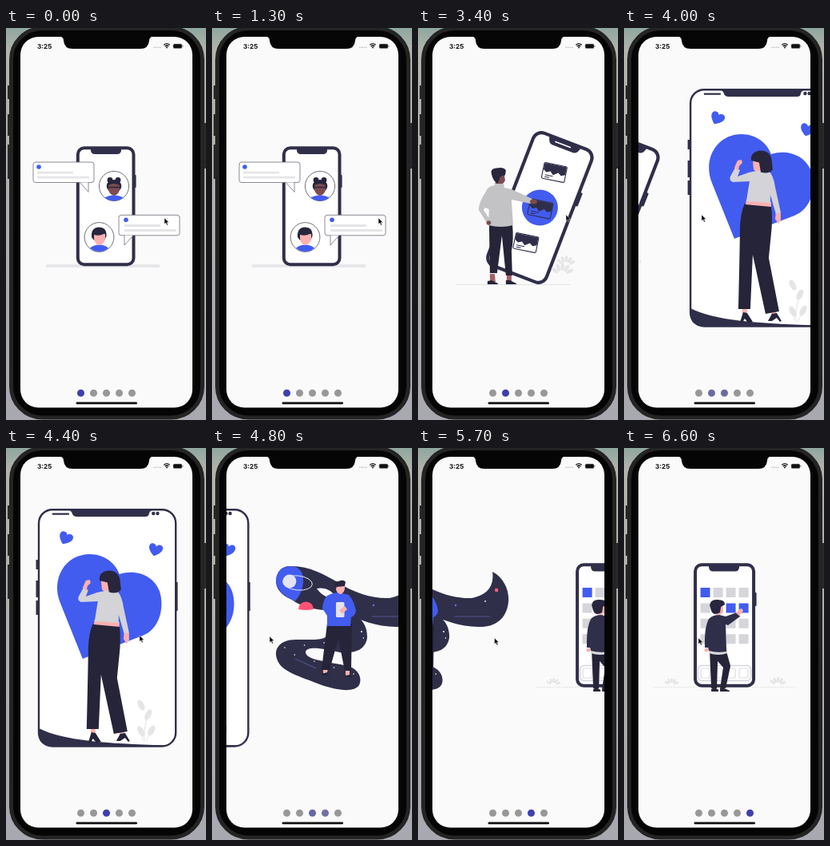
These frames come from a looping animation (250x491 px, 6.8 s). An HTML page with a canvas:

```html
<!DOCTYPE html>
<html lang="en">
<head>
<meta charset="utf-8">
<title>Onboarding carousel</title>
<style>
  html, body { margin: 0; width: 100%; height: 100%; overflow: hidden; background: #b0b0ae; }
  canvas { display: block; width: 250px; height: 491px; }
</style>
</head>
<body>
<canvas id="stage"></canvas>
<script>
const W = 250, H = 491, LOOP = 6800, STEP = 100, PAGE = 215;
const PAPER = '#fafafa', WHITE = '#ffffff', INK = '#302f4a', DARK = '#252438', HAIR = '#27263c';
const BLUE = '#425cf0', PALE = '#e5e5e8', PINK = '#fbb0b0', BROWN = '#7d4c50';
const DOT_ON = [63, 63, 176], DOT_OFF = [152, 152, 152];

const canvas = document.getElementById('stage');
const ctx = canvas.getContext('2d');
const dpr = window.devicePixelRatio || 1;
canvas.width = W * dpr;
canvas.height = H * dpr;

// --- drawing helpers -------------------------------------------------
function paint(path, fill, stroke, width = 1) {
  if (fill) { ctx.fillStyle = fill; ctx.fill(path); }
  if (stroke) { ctx.strokeStyle = stroke; ctx.lineWidth = width; ctx.stroke(path); }
}
function shape(d, fill, stroke, width) { paint(new Path2D(d), fill, stroke, width); }
function box(x, y, w, h, r, fill, stroke, width) {
  const p = new Path2D();
  p.roundRect(x, y, w, h, r);
  paint(p, fill, stroke, width);
}
function oval(x, y, rx, ry, fill, stroke, width, turn = 0) {
  const p = new Path2D();
  p.ellipse(x, y, rx, ry, turn, 0, 7);
  paint(p, fill, stroke, width);
}
function disc(x, y, r, fill, stroke, width) { oval(x, y, r, r, fill, stroke, width); }
function line(d, color, width) { shape(d, null, color, width); }
function at(x, y, turn, draw) {
  ctx.save();
  ctx.translate(x, y);
  ctx.rotate(turn);
  draw();
  ctx.restore();
}
function leaves(x, y, size) {
  for (let i = 0; i < 5; i++) {
    const a = -2.5 + i * 0.5;
    oval(x + Math.cos(a) * size, y + Math.sin(a) * size, size * 0.45, size * 0.2, PALE, null, 0, a);
  }
}

// --- page 1: chat ----------------------------------------------------
function bubble(x, y, tail, dotX) {
  box(x, y, 76, 25.5, 3, WHITE, '#6e6d7c', 0.8);
  shape(tail, WHITE, '#6e6d7c', 0.8);
  disc(x + dotX, y + 6, 2.8, BLUE);
  line(`M${x + dotX - 2} ${y + 13.2}h45M${x + dotX - 2} ${y + 19.2}h65`, PALE, 2.8);
}
function chatPage() {
  line('M50 298H192', PALE, 3.5);
  box(160, 184, 2.6, 16, 1, INK);
  box(89.8, 150.3, 69.7, 146, 8, WHITE, INK, 4);
  shape('M106 151h38v3q-1 4-5 4h-28q-4 0-5-4z', INK);
  bubble(34, 168, 'M92.5 193.5L103 205.5V193.5', 7);
  bubble(141, 234.3, 'M148 259.8V272L159 259.8', 9);

  disc(135, 198, 18.6, WHITE, '#4d4c60', 0.8);
  shape('M123.5 212.5q5-3 11.5-3t11.5 3q-5 4-11.5 4t-11.5-4z', BLUE);
  disc(130, 190.5, 3.4, HAIR);
  disc(140, 190.5, 3.4, HAIR);
  oval(135, 198, 9.3, 8, HAIR);
  shape('M128 197q7-4 14 0v6q-2 6-7 7q-5-1-7-7z', BROWN);
  line('M128 199.5h14', HAIR, 1.6);

  disc(116.5, 262, 18.4, WHITE, '#4d4c60', 0.8);
  shape('M105 275.5q5-4 11.5-4t11.5 4q-5 4.5-11.5 4.5t-11.5-4.5z', BLUE);
  shape('M107 262q-1-12 9-12.5q10 0 9.5 11l-2 5h-14z', HAIR);
  shape('M110 259q7 2 12-1h2v6q-1 6-7 8q-6-1-7-8z', PINK);
}

// --- page 2: cards ---------------------------------------------------
function card(x, y, fill) {
  at(x, y, 0.2, () => {
    box(-14.5, -10, 29, 20, 1.5, fill, INK, 1.1);
    shape('M-14-9.5h28v10l-5 2-4-3-6 4-4-4-5 2-4-3z', INK);
    line('M-11 5h10M-11 7.5h6', INK, 1);
  });
}
function cardPage() {
  line('M46 321.5H190', '#dedee2', 0.8);
  at(151.5, 225, 0.367, () => {
    box(40, -36, 3.5, 18, 1, INK);
    box(-39, -89, 78, 178, 11, WHITE, INK, 4.2);
    shape('M-21-88h42q-2 9-7 9h-28q-5 0-7-9z', INK);
    line('M-12-84H9', WHITE, 1.5);
  });
  leaves(179, 310, 11);
  leaves(184, 298, 9);
  disc(151.5, 225, 22.5, BLUE);
  card(169.5, 181, WHITE);
  card(152, 226.5, BLUE);
  card(134, 269, WHITE);

  shape('M89 308h6l1 10h-7zM110 308h6v10h-6z', '#a4606a');
  shape('M86 321v-4l5-1 8 4v1zM109 321v-5h5l8 4v1z', DARK);
  shape('M88 245h29q2 20-1 34l1 31h-8l-5-50-6 47H89z', DARK);
  shape('M95 193l11 0 1 7 9 2 26 12-2 6-24-5 2 32q-15 4-31 0l1-20-5-2-2 3 8 12-4 4-10-16q0-10 9-23 2-7 11-8z', '#c3c3c6');
  disc(87.5, 244, 2.8, BROWN);
  oval(143.5, 217.5, 4.5, 3, BROWN);
  shape('M97 184h10l1 7q-2 5-7 4h-5z', BROWN);
  shape('M91 183q-2-7 6-7.5q10-2 12 3l-1 6q-4 0-6 2l-3 8q-6-2-8-11.5z', HAIR);
}

// --- page 3: heart ---------------------------------------------------
function heart(x, y, size, turn) {
  at(x, y, turn, () => {
    ctx.scale(size, size);
    shape('M0 8C-14-1-9-9-4-8Q-1-8 0-5Q1-8 4-8C9-9 14-1 0 8z', BLUE);
  });
}
function heartPage() {
  line('M81 140v12M81 166v21M81 191v18M255.5 168v36', INK, 2.6);
  box(83.2, 77.2, 171.2, 296.3, 17, WHITE, INK, 2.4);
  shape('M118 77h110q-6 1-7 5 0 4-5 4H131q-5 0-6-4-1-4-7-5z', INK);
  line('M100 82.6h21', INK, 2.2);
  disc(226.5, 82, 2.2, INK);
  disc(231.7, 82, 2.2, INK);
  shape('M83 351C115 367 168 370 240 372.5L236 374H98Q84 372 83 360z', INK);
  heart(116.5, 113.5, 0.95, 0.45);
  heart(229, 128, 0.95, 0.25);
  shape('M138 264L110 194C98 164 116 133 147 133C165 133 179 144 184 158C205 151 227 160 234 179C241 200 234 227 213 235z', BLUE);
  for (const [x, y] of [[211, 322], [220, 334], [211, 355], [224, 354]]) {
    oval(x, y, 3.6, 7.2, PALE, null, 0, x % 2 ? -0.5 : 0.5);
  }
  line('M215 368Q214 345 221 335M213 366L211 352M217 368L225 352', PALE, 1);

  shape('M148 348h6v9h-6zM184 353h6v8h-6z', PINK);
  shape('M145 369l4-13 5 1 7 11-6 1-4-5-3 5zM180 367l5-9 6-1 6 10-2 1-4-5-6 4z', DARK);
  shape('M151 220h33q2 22 0 38l-3 30 13 67-17 3-16-74-3 68h-15q2-83 2-102 1-20 6-30z', DARK);
  shape('M153 215l31 3v6l-32-3z', PINK);
  shape('M190 231l6 0 0 10-3 4-4-6z', PINK);
  shape('M163 177l13-2 1 10-10 2z', PINK);
  shape('M156 181q18-4 25-2 6 6 8 20l7 32-6 2-7-24v10l-30-2 4-25-21 1q-5-2-3-7l6-11 6 3-3 8z', '#d4d3d8');
  shape('M138 175l4-9 5-1 1 4-4 4-1 6z', PINK);
  shape('M161 164l9-3 3 14q-7 6-11 2z', PINK);
  shape('M159 166q-1-12 13-12.5 12 1 13 14l1 10q-5 6-15 3l-2-12z', HAIR);
}

// --- page 4: space ---------------------------------------------------
function spacePage() {
  shape('M97 148C120 147 140 158 157 168C178 182 202 189 222 188C243 184 250 172 248 155C262 162 269 178 268 192C266 215 250 225 230 224C205 224 185 215 170 208C150 201 120 206 100 190C86 184 80 176 80 166C81 154 88 148 97 148z', INK);
  shape('M131 176Q147 173 157 189Q140 189 131 176z', PAPER);
  shape('M160 205C185 205 195 222 194 238C191 255 176 257 160 256C140 251 117 247 117 256C118 265 140 267 165 272C185 275 188 290 184 297C178 306 160 304 140 298C115 288 92 282 84 270C74 253 84 240 105 240C130 240 146 242 147 228C147 214 150 205 160 205z', INK);
  shape('M97 148Q111 148 114 161Q116 178 104 192Q81 182 80 166Q81 150 97 148z', BLUE);
  oval(107, 169, 18.5, 9, null, '#e8e8f2', 1, 0.1);
  disc(97, 167, 8.4, '#e2e4f4');
  shape('M108 202a9.5 9.5 0 0 1 19 0q-10 2-19 0z', '#ff5276');
  line('M104 264L130 276M200 211H245', '#53548a', 1.2);
  for (let i = 0; i < 9; i++) {
    const x = 91 + i * 12.3, y = i % 2 ? 291 - (9 - i) * 4 : 250 - i * 1.5;
    disc(x, y, 0.8, WHITE);
  }
  disc(253, 178, 2.2, '#ff5e7c');
  disc(239, 192, 1, '#e4e4f0');
  disc(202, 197, 1.2, '#6478f4');
  disc(187, 230, 1, WHITE);
  disc(194, 245, 0.8, WHITE);

  shape('M139 275h6l-1 7h-5zM167 277h5v8h-5z', PINK);
  shape('M137 283l7-2 3 3-9 1zM166 285l7-1 2 3h-8z', DARK);
  shape('M144 220h31l-1 59h-8l-8-40-11 39h-10z', DARK);
  shape('M144 185q8-4 14-4l13 3q7 8 9 20-1 6-6 8l-1 11h-29v-13l-6-9q1-11 6-16z', BLUE);
  box(155, 193, 10.5, 19, 1.5, '#e4e4ee');
  shape('M159 203l7-5 3 4-6 6z', PINK);
  shape('M155 170h11v7q-2 6-6 6-5-2-5-7z', PINK);
  shape('M153 172q0-5 5-5 7-3 9 1l-1 5-10 1-1 2z', HAIR);
}

// --- page 5: apps ----------------------------------------------------
function appsPage() {
  ctx.setLineDash([2, 1.5]);
  line('M37 299.5H213', '#d8d8dc', 0.8);
  ctx.setLineDash([]);
  leaves(59, 298, 7);
  leaves(192, 298, 8);
  box(163, 181, 2.5, 17, 1, INK);
  box(89, 146.3, 73, 151.5, 8, WHITE, INK, 4);
  shape('M106 147h38v3q-1 4.5-5 4.5h-28q-4 0-5-4.5z', INK);
  for (let i = 0; i < 16; i++) {
    const col = i % 4, row = i >> 2;
    const on = i === 0 || i === 6 || i === 7;
    box(95.5 + col * 16, 175 + row * 19.4, 12, 12, 0.5, on ? BLUE : '#d5d5da');
  }
  box(92.5, 272.5, 66, 19, 5, null, '#d5d5da', 1.5);
  for (let i = 0; i < 4; i++) box(96 + i * 16, 276, 11, 12, 2, null, '#dddde2', 1.2);

  shape('M109 305v-3l4-2 5 3v2zM120 305v-4h5l7 3v1z', DARK);
  shape('M107 255h21l5 18-6 28h-7l4-26-7-8-1 34h-7z', DARK);
  shape('M106 252l22 0 1 5q-11 4-23 0z', '#d8d8dc');
  shape('M106 214q5-5 13-5l8 2 14-5 4 5-15 11-3-1 1 34q-12 2-22-1l-1-4h-4q-1-25 5-36z', INK);
  disc(103, 253, 2.5, PINK);
  shape('M140 207l4-5 3-1 2 3-5 6z', PINK);
  shape('M114 197h9l1 8q-3 5-8 4z', PINK);
  shape('M107 197q1-8 10-7 9 0 9 6l-5 3-1 7q-8 5-11-2z', HAIR);
}

// --- motion ----------------------------------------------------------
// The draw function of each page, with the x shift to its resting place.
const pages = [[chatPage, 0], [cardPage, -3], [heartPage, -44], [spacePage, -50], [appsPage, 0]];
// Moments at which each swipe passes the halfway point.
const swipes = [2985, 3888, 4704, 5703];
const DRAG = 250, GLIDE = 125, FADE = 220;
const pointerKeys = [
  [100, 198, 238], [400, 204, 238], [1100, 204, 238], [1400, 210, 238], [2735, 210, 238],
  [2985, 110, 236], [3050, 104, 236], [3400, 185, 234], [3640, 203, 234], [3888, 102, 234],
  [4000, 97, 234], [4150, 97, 234], [4454, 182, 235], [4704, 77, 236], [4800, 72, 236],
  [4950, 74, 236], [5400, 196, 238], [5453, 198, 238], [5703, 93, 238]
];
const clamp = v => Math.max(0, Math.min(1, v));

function swipe(dt) {
  return dt < 0 ? 0.5 * clamp(1 + dt / DRAG) ** 2 : 1 - 0.5 * Math.exp(-dt / GLIDE);
}
function position(t) { return swipes.reduce((sum, s) => sum + swipe(t - s), 0); }

function pointer(t) {
  const i = pointerKeys.findIndex(k => k[0] > t);
  if (i === 0) return pointerKeys[0].slice(1);
  if (i < 0) return pointerKeys[pointerKeys.length - 1].slice(1);
  const [t0, x0, y0] = pointerKeys[i - 1], [t1, x1, y1] = pointerKeys[i];
  let u = (t - t0) / (t1 - t0);
  if (t1 - t0 === DRAG) u *= u;
  return [x0 + (x1 - x0) * u, y0 + (y1 - y0) * u];
}

// --- device ----------------------------------------------------------
function drawDevice() {
  const g = ctx.createLinearGradient(0, 0, 0, H);
  g.addColorStop(0, '#8fa79f');
  g.addColorStop(0.06, '#b4b4ac');
  g.addColorStop(1, '#a8a8b0');
  ctx.fillStyle = g;
  ctx.fillRect(0, 0, W, H);
  line('M4 72v17M4 108v27M4 146v43M248 119v57', '#2a2a2a', 4);
  box(6.5, 0.5, 239, 487.5, 39, '#050506', '#242424', 5);
}
function drawStatus() {
  shape('M66 10Q72 11 72 16Q73 26 83 26H168Q178 26 179 16Q179 11 185 10z', '#050506');
  ctx.fillStyle = '#111';
  ctx.font = '700 8.2px Inter, "Liberation Sans", sans-serif';
  ctx.fillText('3:25', 39, 25.8);
  for (let i = 0; i < 4; i++) disc(185 + i * 2.6, 24.2, 0.7, '#a8a8a8');
  line('M197.3 21.3Q201 18 204.7 21.3M198.7 23Q201 21 203.3 23', '#111', 1.3);
  shape('M199.6 24Q201 23 202.4 24L201 25.8z', '#111');
  box(209, 20, 11, 5.5, 1.6, '#111', '#8c8c8c', 0.5);
  box(220.5, 21.7, 1, 2, 0.5, '#8c8c8c');
  box(87.5, 468.5, 76.5, 2.8, 1.4, '#111');
}
function drawDots(t) {
  for (let i = 0; i < 5; i++) {
    const came = i ? clamp((t - swipes[i - 1]) / FADE) : 1;
    const left = i < 4 ? clamp((t - swipes[i]) / FADE) : 0;
    const rgb = DOT_OFF.map((c, k) => Math.round(c + (DOT_ON[k] - c) * (came - left)));
    disc(93.5 + i * 16, 457.3, 4.5, `rgb(${rgb})`);
  }
}
function drawPointer(t) {
  const [x, y] = pointer(t);
  at(x, y, 0, () => shape('M0 0V7.6L1.8 6 3.1 9 4.4 8.4 3.2 5.5H5.6z', '#080808', WHITE, 0.4));
}

function render(t) {
  ctx.setTransform(dpr, 0, 0, dpr, 0, 0);
  drawDevice();
  ctx.save();
  const screen = new Path2D();
  screen.roundRect(18, 11, PAGE, 464.5, 22.5);
  ctx.clip(screen);
  ctx.fillStyle = PAPER;
  ctx.fillRect(0, 0, W, H);
  const pos = position(t);
  pages.forEach(([draw, shift], i) => {
    if (Math.abs(i - pos) < 1.2) at((i - pos) * PAGE + shift, 0, 0, draw);
  });
  drawStatus();
  drawDots(t);
  ctx.restore();
  drawPointer(t);
}

const start = performance.now();
function tick() {
  const t = (performance.now() - start) % LOOP;
  render(Math.floor(t / STEP) * STEP);
  requestAnimationFrame(tick);
}
tick();
</script>
</body>
</html>
```
